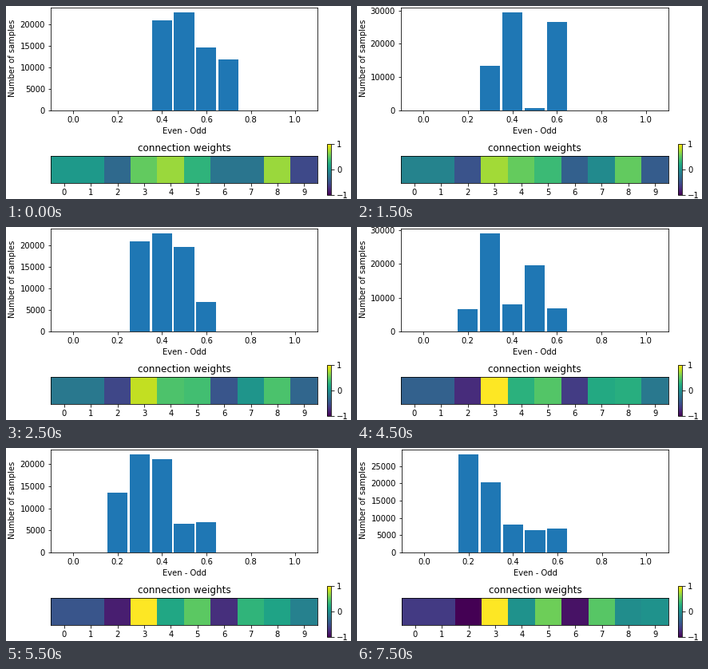
Animation, 432 px wide and 242 px high, one loop 8 s. Source, as a matplotlib script:

```python
import matplotlib.pyplot as plt
import numpy as np
from matplotlib.animation import FuncAnimation

W, H, DPI = 432, 242, 72
STEPS = 8

# groups of samples (in hundreds); each one's score, in tenths, falls steadily
SIZE = np.array([67, 68, 74, 75, 73, 72, 8, 50, 65, 81, 69])
SCORE = np.array([3.8, 3.9, 4.1, 4.55, 4.77, 4.75, 4.9, 6.55, 5.9, 6.1, 6.62])
FALL = np.array([.27, .25, .23, .295, .255, .17, .19, .39, .17, .28, .1])

# connection weights at the first and last step; the colour scale clips them
FIRST = np.array([.08, .08, -.32, .52, .7, .3, -.22, -.22, .7, -.56])
LAST = np.array([-.66, -.66, -1, 1.32, .02, .56, -.9, .48, -.02, .02])


def counts_at(step):
    edges = np.arange(1.5, 8)
    return np.histogram(SCORE - FALL * step, edges, weights=SIZE * 100)[0]


def weights_at(step):
    return FIRST + (LAST - FIRST) * step / STEPS


def box(left, top, right, bottom):
    """Pixel edges, measured from the top left, as an axes rectangle."""
    return [left / W, 1 - bottom / H, (right - left) / W, (bottom - top) / H]


def place(left):
    hist.set_position(box(left, 2, 390, 131))
    strip.set_position(box(left, 188, 390, 222))


plt.rcParams["font.family"] = "DejaVu Sans"
fig = plt.figure(figsize=(W / DPI, H / DPI), dpi=DPI, facecolor="white")

hist = fig.add_axes(box(56, 2, 390, 131))
bars = hist.bar(np.arange(2, 8) / 10, np.zeros(6), width=0.09,
                color="#1f77b4")
hist.set_xlim(-0.1, 1.1)
hist.set_xlabel("Even - Odd")
fig.text(8 / W, 1 - 65.5 / H, "Number of samples", rotation=90,
         ha="center", va="center", fontsize=10)

strip = fig.add_axes(box(56, 188, 390, 222))
cells = strip.imshow([FIRST], cmap="viridis", vmin=-1, vmax=1,
                     aspect="auto", interpolation="nearest")
strip.set_xticks(range(10))
strip.set_yticks([])
strip.set_title("connection weights")

scale = fig.add_axes(box(402, 173, 407, 237))
fig.colorbar(cells, cax=scale, ticks=[-1, 0, 1])


def draw(i):
    step = (i + 1) // 2
    counts = counts_at(step)
    for bar, n in zip(bars, counts):
        bar.set_height(n)
    limit = counts.max() * 1.05
    hist.set_ylim(0, limit)
    place(55 if limit > 30000 else 56)  # layout follows the tick labels
    cells.set_data([weights_at(step)])
    return [*bars, cells]


anim = FuncAnimation(fig, draw, frames=2 * STEPS, interval=500, repeat=True,
                     repeat_delay=0, blit=False)
plt.show()
```
